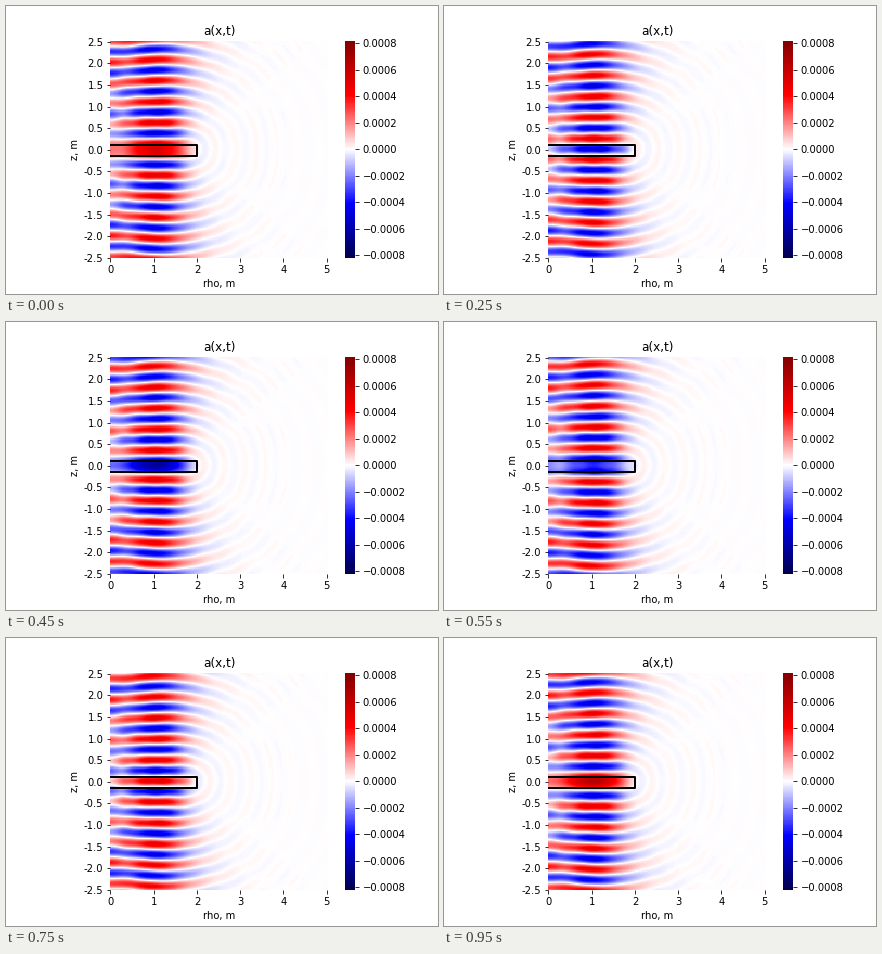
Animation of 432 by 288 pixels, one loop 1000 ms. Source, as a matplotlib script:

```python
import numpy as np
import matplotlib.pyplot as plt
from matplotlib.animation import FuncAnimation

FRAMES, INTERVAL = 20, 50
CELL = 0.025
WAVE_K = 2 * np.pi / 0.48
HALF_DEPTH, RADIUS = 0.125, 2.0
AMPLITUDE, LIMIT = 4.9e-4, 8.22e-4


def bessel_j0(x):
    n = 96
    angles = (np.arange(n) + 0.5) * np.pi / n
    return sum(np.cos(x * np.cos(a)) for a in angles) / n


def source_profile(r):
    ring = 0.38 + 0.62 * np.sin(np.pi * r / 2.1) ** 2
    return ring * (1 - (r / RADIUS) ** 8)


def slab_response(k_rho, z):
    """Wave along z from a slab that radiates with radial wavenumber k_rho."""
    kz = np.sqrt(WAVE_K**2 * (1 + 0.004j) - k_rho**2 + 0j)[:, None]
    dist = np.abs(z)[None, :]
    near = np.minimum(dist, HALF_DEPTH)
    inside = np.exp(1j * kz * HALF_DEPTH) * np.cos(kz * near) - 1
    outside = 1j * np.sin(kz * HALF_DEPTH) * np.exp(1j * kz * dist)
    return np.where(dist < HALF_DEPTH, inside, outside) * (WAVE_K / kz) ** 2


def radiated_field():
    """Complex field of the disk, as a sum of cylindrical waves."""
    rho = np.arange(201) * CELL
    z = np.arange(-100, 101) * CELL
    dk = 0.025
    k_rho = np.arange(dk / 2, 30, dk)

    dr = 0.02
    r = np.arange(dr / 2, RADIUS, dr)
    spectrum = bessel_j0(np.outer(k_rho, r)) @ (source_profile(r) * r * dr)

    radial = bessel_j0(np.outer(rho, k_rho)) * (spectrum * k_rho * dk)
    return -AMPLITUDE * (radial @ slab_response(k_rho, z)).T


field = radiated_field()


def snapshot(frame):
    return np.real(field * np.exp(-2j * np.pi * frame / FRAMES))


plt.rcParams["font.family"] = "DejaVu Sans"
fig, ax = plt.subplots(figsize=(6, 4), dpi=72)
fig.subplots_adjust(left=0.125, right=0.9, bottom=0.125, top=0.88)

# Ticks mark the lower edge of a cell, so the map reaches one cell further.
extent = (0, 5 + CELL, -2.5, 2.5 + CELL)
image = ax.imshow(snapshot(0), cmap="seismic", vmin=-LIMIT, vmax=LIMIT,
                  origin="lower", extent=extent, interpolation="nearest")
bar = fig.colorbar(image, ax=ax, ticks=np.arange(-8, 9, 2) * 1e-4)
bar.outline.set_visible(False)
ax.spines[:].set_visible(False)

top, bottom = 0.1, -0.15
ax.plot([0, RADIUS, RADIUS, 0], [top, top, bottom, bottom], color="black", lw=2)
heights = np.arange(-5, 6) / 2
ax.set_yticks(heights, [f"{z:.1f}" for z in heights])
ax.set(xlim=extent[:2], ylim=extent[2:], xticks=range(6),
       title="a(x,t)", xlabel="rho, m", ylabel="z, m")


def update(frame):
    image.set_data(snapshot(frame))
    return [image]


anim = FuncAnimation(fig, update, frames=FRAMES, interval=INTERVAL,
                     repeat=True, repeat_delay=0)
plt.show()
```
